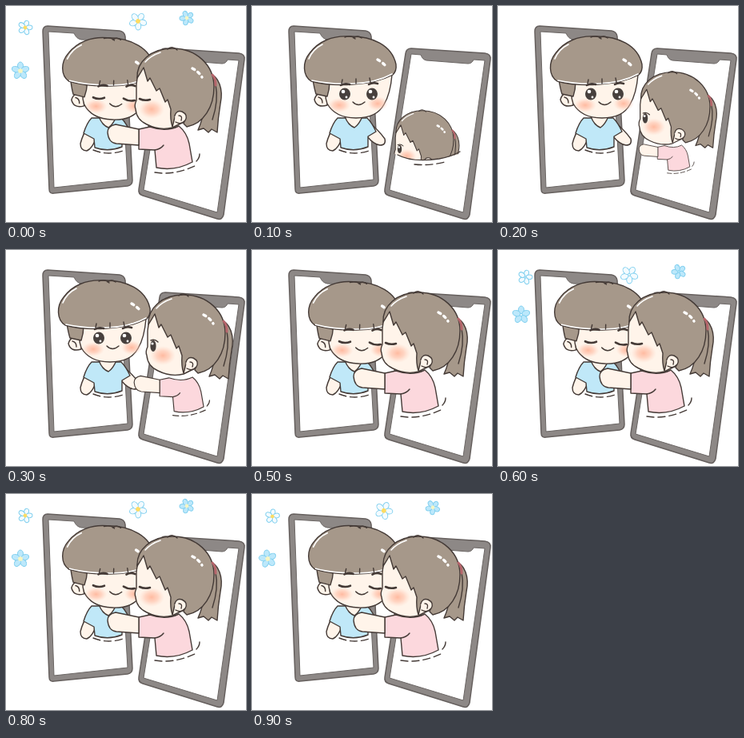
An HTML page that plays this animation: 300 px wide and 270 px high, repeating every 1 s.

```html
<!DOCTYPE html>
<html lang="en">
<head>
<meta charset="utf-8">
<title>Kiss through the phones</title>
<style>
html, body { margin: 0; width: 100%; height: 100%; overflow: hidden; background: #fff; }
svg { display: block; width: 100vw; height: 100vh; }
.ink { fill: none; stroke: #443a36; stroke-width: 1.4; stroke-linecap: round; stroke-linejoin: round; }
.bold { stroke-width: 2.6; }
.hair { fill: #a6988a; }
.skin { fill: #fff4ea; }
.blue { fill: #c0e8f8; }
.pink { fill: #fcd8dd; }
.dark { fill: #47403d; }
.blush { fill: url(#blush); }
.shine { fill: none; stroke: #fff; stroke-width: 1.6; stroke-linecap: round; }
.dots { stroke-width: 3.4; stroke-dasharray: 3 5; }
.case { fill: #8d8886; stroke: #66605e; stroke-width: 1.5; stroke-linejoin: round; }
.screen { fill: #fff; stroke: #6b6664; stroke-width: 1; stroke-linejoin: round; }
.dash { stroke-dasharray: 9 5; }
</style>
</head>
<body>
<svg viewBox="0 0 300 270" preserveAspectRatio="none">
  <defs>
    <radialGradient id="blush">
      <stop offset="0" stop-color="#ffb093" stop-opacity=".85"/>
      <stop offset=".5" stop-color="#ffc0a8" stop-opacity=".6"/>
      <stop offset="1" stop-color="#ffd2c0" stop-opacity="0"/>
    </radialGradient>
    <clipPath id="hole"><path d="M160 100H285V174Q258 187 234 191Q200 196 182 186L160 180Z"/></clipPath>
  </defs>

  <path class="case" d="M52 25L142 31Q148 32 149 38L158 218Q158 224 152 225L60 234Q54 235 54 229L46 32Q46 25 52 25Z"/>
  <path class="screen" d="M53 32L85 34Q88 41 94 42L137 44Q141 43 142 40L152 217L60 227Z"/>
  <path class="case" d="M199 53L291 59Q299 60 298 67L272 261Q270 268 264 266L171 237Q165 235 166 229L192 59Q193 53 199 53Z"/>
  <path class="screen" d="M199 60L211 61Q213 67 218 68L270 72Q275 72 277 67L291 68L264 258L172 230Z"/>

  <g id="boy">
    <path class="ink dash" d="M109 180Q128 188 149 180"/>
    <path class="ink skin" id="reach" d="M147 146Q158 155 166 166Q168 174 160 174Q152 173 144 163Z"/>
    <path class="ink skin" d="M104 148Q96 160 93 172Q93 181 101 181Q108 178 112 166Z"/>
    <path class="ink blue" d="M107 140Q101 146 97 159L110 166L111 177Q128 183 145 176L145 163L155 157Q150 146 144 140Z"/>
    <path class="ink skin" d="M116 138Q120 149 128 152Q134 148 138 138Z"/>
    <g id="boyHead">
      <path class="ink skin" d="M93 110Q81 106 78 117Q81 128 94 124Z"/>
      <path class="ink" d="M83 114Q88 115 88 121"/>
      <path class="ink skin" d="M92 90Q90 112 94 122Q104 140 130 140Q156 140 165 123Q173 110 175 86Z"/>
      <path class="ink hair" d="M76 92Q78 104 80 110L94 113Q97 104 97 94Z"/>
      <path class="ink hair" d="M74 94C63 87 63 70 72 59C83 44 101 37 120 38C150 37 175 49 180 73Q181 81 176 86Q155 97 126 98Q96 100 74 94Z"/>
      <path class="shine" d="M75 93Q96 98 126 97Q155 96 175 85M71 66Q76 54 88 48"/>
      <path class="shine dots" d="M157 67Q164 71 169 77"/>
      <path class="ink" d="M116 39Q124 36 129 41M127 40Q132 36 137 40M112 97L113 92M130 97L130 91M148 95L147 90"/>
      <ellipse class="blush" cx="109" cy="124" rx="14" ry="9"/>
      <ellipse class="blush" cx="157" cy="122" rx="13" ry="9"/>
      <path class="ink bold" d="M111 99Q116 96 122 98M146 98Q151 95 157 97"/>
      <g id="boyOpen">
        <ellipse class="dark" cx="116" cy="110" rx="7" ry="7.5"/>
        <ellipse class="dark" cx="150" cy="110" rx="7" ry="7.5"/>
        <g fill="#fff">
          <circle cx="114" cy="107" r="2.3"/><circle cx="118" cy="114" r="1.4"/>
          <circle cx="148" cy="107" r="2.3"/><circle cx="152" cy="114" r="1.4"/>
        </g>
      </g>
      <path class="ink bold" id="boyShut" d="M105 113Q112 116 119 113M143 113Q150 117 157 115"/>
      <path class="ink" d="M126 120Q133 127 141 120"/>
    </g>
  </g>

  <g id="girl">
    <g id="girlBody">
      <path class="ink dash" d="M186 208Q210 212 236 200"/>
      <path class="ink" d="M238 194Q242 190 242 185"/>
      <path class="ink pink" d="M166 154L180 151Q200 158 216 150Q226 158 229 172L233 195Q211 207 188 202L186 180L166 179Z"/>
      <path class="ink" d="M186 180Q193 179 197 174"/>
      <path class="ink skin" d="M166 154L137 148Q127 150 127 158Q128 171 138 172L166 174Z"/>
    </g>
    <g id="girlClip">
      <g id="girlHead">
        <path class="ink hair" d="M254 84C266 88 272 104 268 122Q265 140 264 158L257 154L253 158L247 153L240 155Q246 142 249 122Z"/>
        <path class="ink" d="M262 98Q266 118 258 142"/>
        <path class="ink skin" d="M173 70Q164 82 163 98L163 118Q160 124 162 129Q163 142 176 148Q192 156 208 152L232 140L220 80Z"/>
        <ellipse class="blush" cx="182" cy="129" rx="16" ry="12"/>
        <g id="girlOpen">
          <ellipse class="dark" cx="170" cy="117" rx="3.6" ry="7"/>
          <circle cx="169" cy="114" r="1.6" fill="#fff"/>
          <path class="ink" d="M167 110Q172 108 176 112"/>
        </g>
        <path class="ink bold" id="girlShut" d="M167 116Q173 119 180 117"/>
        <path class="ink hair" d="M164 90C163 70 181 53 208 53C238 53 260 74 260 101C260 126 247 147 226 151L222 147Q226 138 218 132Q212 132 211 139L208 151Q205 142 206 129L202 117L199 120L192 103L188 106L180 90L177 94L172 77Q168 84 164 90Z"/>
        <path class="ink skin" d="M211 137Q213 130 220 132Q228 136 224 143Q219 149 212 145"/>
        <path class="ink" d="M216 137Q221 137 219 143M202 54Q208 49 214 55"/>
        <path class="shine" d="M174 70Q181 62 193 58"/>
        <path class="shine dots" d="M233 78Q241 82 245 89"/>
        <path d="M258 86Q262 90 262 99" fill="none" stroke="#b5656b" stroke-width="3" stroke-linecap="round"/>
      </g>
    </g>
    <g id="rim">
      <path class="ink" d="M182 186Q200 196 234 191Q250 188 260 182"/>
      <path class="ink dash" d="M203 198Q222 200 241 195"/>
    </g>
  </g>
  <g id="flowers"></g>
</svg>
<script>
const $ = id => document.getElementById(id);
const show = (id, on) => $(id).style.display = on ? "" : "none";
const place = (id, [x, y, s]) => $(id).setAttribute("transform", `translate(${x} ${y}) scale(${s})`);

// the girl's head and body, each x, y, scale
const kiss = { head: [0, 0, 1], body: [0, 0, 1] };
const poses = [
  kiss,
  { head: [57, 91, .75] },
  { head: [31, 35, .9], body: [100, 84, .6] },
  { head: [14, 3, 1], body: [56, 36, .82] },
  { head: [1, 1, 1], body: [5, 1, 1] }
];

// start x, y, drift x, y, size, white petals
const blooms = [
  [29, 81, -11, 0, 11, 0],
  [34, 34, -10, -7, 9, 1],
  [164, 31, 1, -12, 11, 1],
  [226, 27, 0, -12, 9, 0]
];

function flower(x, y, r, white, turn, open) {
  let petals = "";
  for (let i = 0; i < 5; i++)
    petals += `<ellipse cy="${-r * .56}" rx="${r * .32}" ry="${r * .44}" transform="rotate(${i * 72})"/>`;
  const heart = !open ? "none" : white ? "#ffdc62" : "#f6f5c4";
  return `<g transform="translate(${x} ${y}) rotate(${turn})" fill="${white ? "#f3fbff" : "#bce8fb"}" stroke="#82d0ef">
    ${petals}<circle r="${r * .26}" stroke="none" fill="${heart}"/></g>`;
}

function drawFlowers(step) {
  const out = step === 6 ? 0 : step === 9 ? .85 : 1;
  const turn = step % 2 ? -10 : 0;
  $("flowers").innerHTML = step > 0 && step < 6 ? "" : blooms.map(([x, y, dx, dy, r, white], i) =>
    flower(x + dx * out, y + dy * out, r, white, i * 17 + turn, out > 0)).join("");
}

function draw(step) {
  const { head, body } = poses[step] || kiss;
  const kissing = step === 0 || step > 4, close = kissing || step === 4;
  place("girlHead", head);
  show("girlBody", body);
  if (body) place("girlBody", body);
  $("girlClip").style.clipPath = body ? "none" : "url(#hole)";
  show("rim", !body);
  $("boyHead").setAttribute("transform", close ? "translate(3 2) rotate(2 128 140)" : "");
  show("reach", !close);
  show("boyOpen", !kissing);
  show("boyShut", kissing);
  show("girlOpen", !kissing);
  show("girlShut", kissing);
  drawFlowers(step);
}

let last = -1;
function tick() {
  const step = Math.floor(performance.now() % 1000 / 100);
  if (step !== last) draw(last = step);
  requestAnimationFrame(tick);
}
tick();
</script>
</body>
</html>
```
